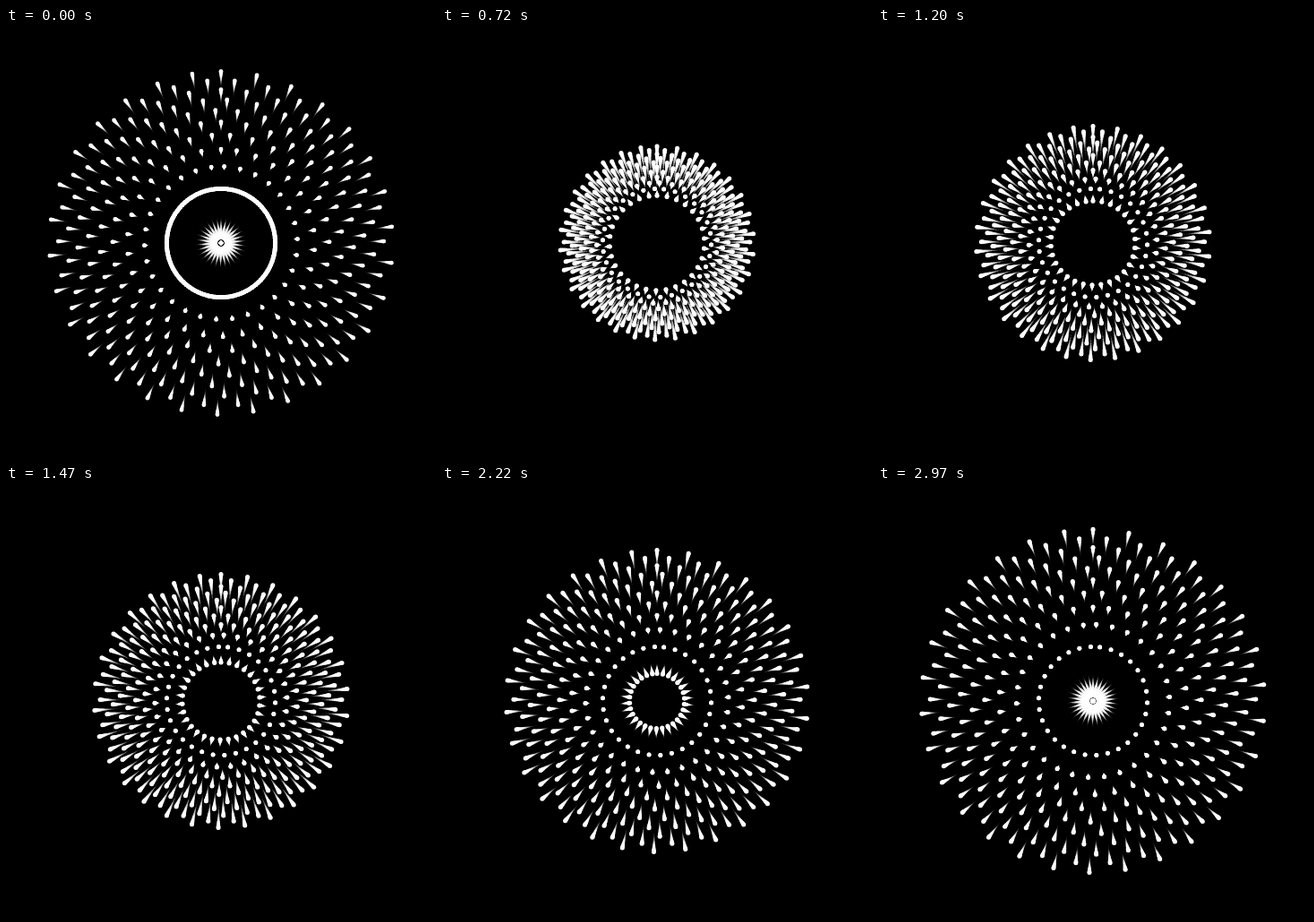
These frames come from a looping animation (480 px wide and 480 px high, 3000 ms). An HTML page with a canvas:

```html
<!DOCTYPE html>
<html lang="en">
<head>
<meta charset="utf-8">
<title>Radial burst</title>
<style>
  html, body { margin: 0; width: 100%; height: 100%; overflow: hidden; background: #000; }
  canvas { display: block; width: 480px; height: 480px; }
</style>
</head>
<body>
<canvas id="stage" width="480" height="480"></canvas>
<script>
const ctx = document.getElementById('stage').getContext('2d');

const STEP = 30;          // ms per picture
const STEPS = 100;        // pictures per loop
const CENTER = 240;
const BASE = 60.6;        // radius of the starting ring
const RINGS = 10;
const PER_RING = 30;
const DOT = 2.5;
const TRAIL = 30;         // trail length in pictures
const TURN = 2 * Math.PI / (5 * PER_RING - 1);

// Five interleaved sets of spokes; the last spoke falls on the first one.
const dots = [];
for (let ring = 0; ring <= RINGS; ring++) {
  const offset = (RINGS - ring) * 2 % 5;
  for (let n = 0; n < PER_RING; n++) {
    const angle = (n * 5 + offset) * TURN;
    dots.push({ ring, dx: Math.sin(angle), dy: -Math.cos(angle) });
  }
}

// The squared radius runs linearly from the shared ring to each dot's own ring.
const radiusAt = (ring, x) => BASE * Math.sqrt(Math.max(0, 1 + (ring - 1) * x));

function draw(step) {
  ctx.globalAlpha = 1;
  ctx.fillStyle = '#000';
  ctx.fillRect(0, 0, 480, 480);
  ctx.fillStyle = '#fff';
  for (let age = TRAIL - 1; age >= 0; age--) {
    const x = (step - age + STEPS) % STEPS / (STEPS - 1);
    const left = 1 - age / TRAIL;
    ctx.globalAlpha = left;
    for (const { ring, dx, dy } of dots) {
      const r = radiusAt(ring, x);
      ctx.beginPath();
      ctx.arc(CENTER + dx * r, CENTER + dy * r, DOT * left ** 2, 0, 2 * Math.PI);
      ctx.fill();
    }
  }
}

let shown = -1;
const start = performance.now();

function tick() {
  const step = Math.floor((performance.now() - start) / STEP) % STEPS;
  if (step !== shown) draw(shown = step);
  requestAnimationFrame(tick);
}
tick();
</script>
</body>
</html>
```
